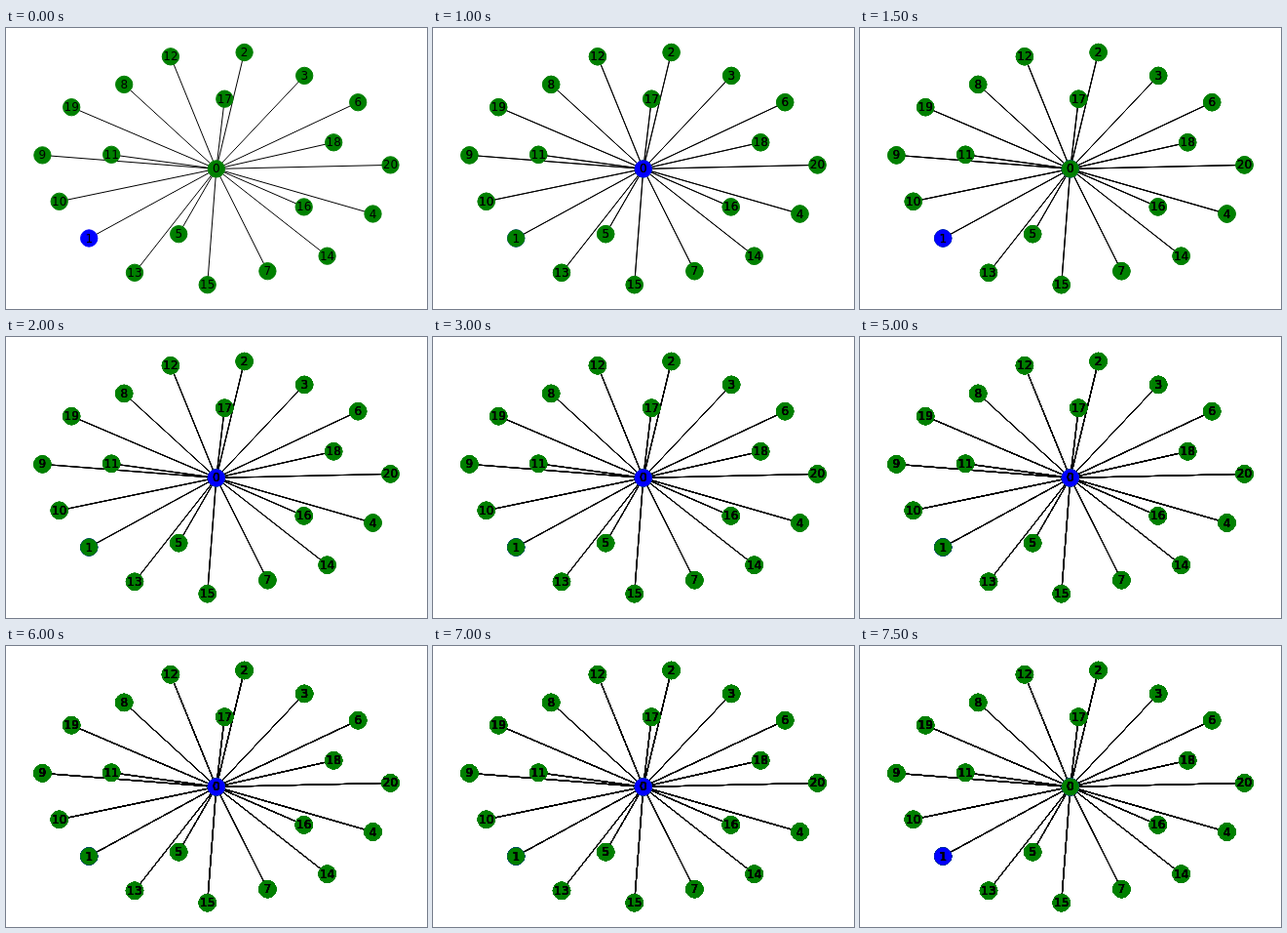
Animation of 432x288 px, one loop 8 s. Source, as an HTML page:

```html
<!DOCTYPE html>
<html lang="en">
<head>
<meta charset="utf-8">
<title>Token on a star graph</title>
<style>
  html, body { margin: 0; width: 100%; height: 100%; overflow: hidden; background: #fff; }
  svg { display: block; width: 432px; height: 288px; }
  line { stroke: #000; stroke-width: 1; }
  circle { stroke-width: 1; }
  text { font: 12px "DejaVu Sans", sans-serif; text-anchor: middle; }
</style>
</head>
<body>
<svg id="stage" viewBox="0 0 432 288"></svg>
<script>
const LOOP = 8000, STEP = 500, STEPS = 15;
const RADIUS = 8.66;
const nodes = [
  [215.8, 144.4], [85.2, 215.5], [244.6, 25], [306.2, 48.9], [376.5, 190.5],
  [177.2, 211.2], [361.2, 76.2], [268.4, 249.2], [121.2, 57.9], [37.4, 130.4],
  [54.7, 177.8], [108.2, 129.8], [168.9, 29.3], [132, 250.8], [329.6, 233.7],
  [206.7, 263.2], [305.7, 183.4], [224.3, 72.7], [336.2, 117.3], [67.2, 81.2],
  [394.5, 140.4]
];

function add(parent, tag, attrs = {}) {
  const el = document.createElementNS("http://www.w3.org/2000/svg", tag);
  for (const key in attrs) el.setAttribute(key, attrs[key]);
  return parent.appendChild(el);
}

// The token hops between leaf 1 and the hub.
const holder = step => step % 2 ? 0 : 1;

function drawEdges(group) {
  const [x1, y1] = nodes[0];
  nodes.slice(1).forEach(([x2, y2]) => add(group, "line", { x1, y1, x2, y2 }));
}

function drawNodes(group, step) {
  nodes.forEach(([cx, cy], i) => {
    const color = i === holder(step) ? "#0000ff" : "#008000";
    add(group, "circle", { cx, cy, r: RADIUS, fill: color, stroke: color });
  });
}

function drawLabels(group) {
  nodes.forEach(([x, y], i) => {
    add(group, "text", { x, y: Math.round(y + 4) }).textContent = i;
  });
}

// Each step paints over the earlier ones, so soft edges build up.
const stage = document.getElementById("stage");
const layers = [drawEdges, drawNodes, drawLabels].map(draw => {
  const parent = add(stage, "g");
  return Array.from({ length: STEPS }, (_, step) => {
    const group = add(parent, "g");
    draw(group, step);
    return group;
  });
});

let shown = -1;

function render(time) {
  const step = Math.max(0, Math.floor((time % LOOP) / STEP) - 1);
  if (step === shown) return;
  shown = step;
  for (const groups of layers) {
    groups.forEach((group, i) => group.style.display = i <= step ? "" : "none");
  }
}

const start = performance.now();

function tick() {
  render(performance.now() - start);
  requestAnimationFrame(tick);
}

tick();
</script>
</body>
</html>
```
